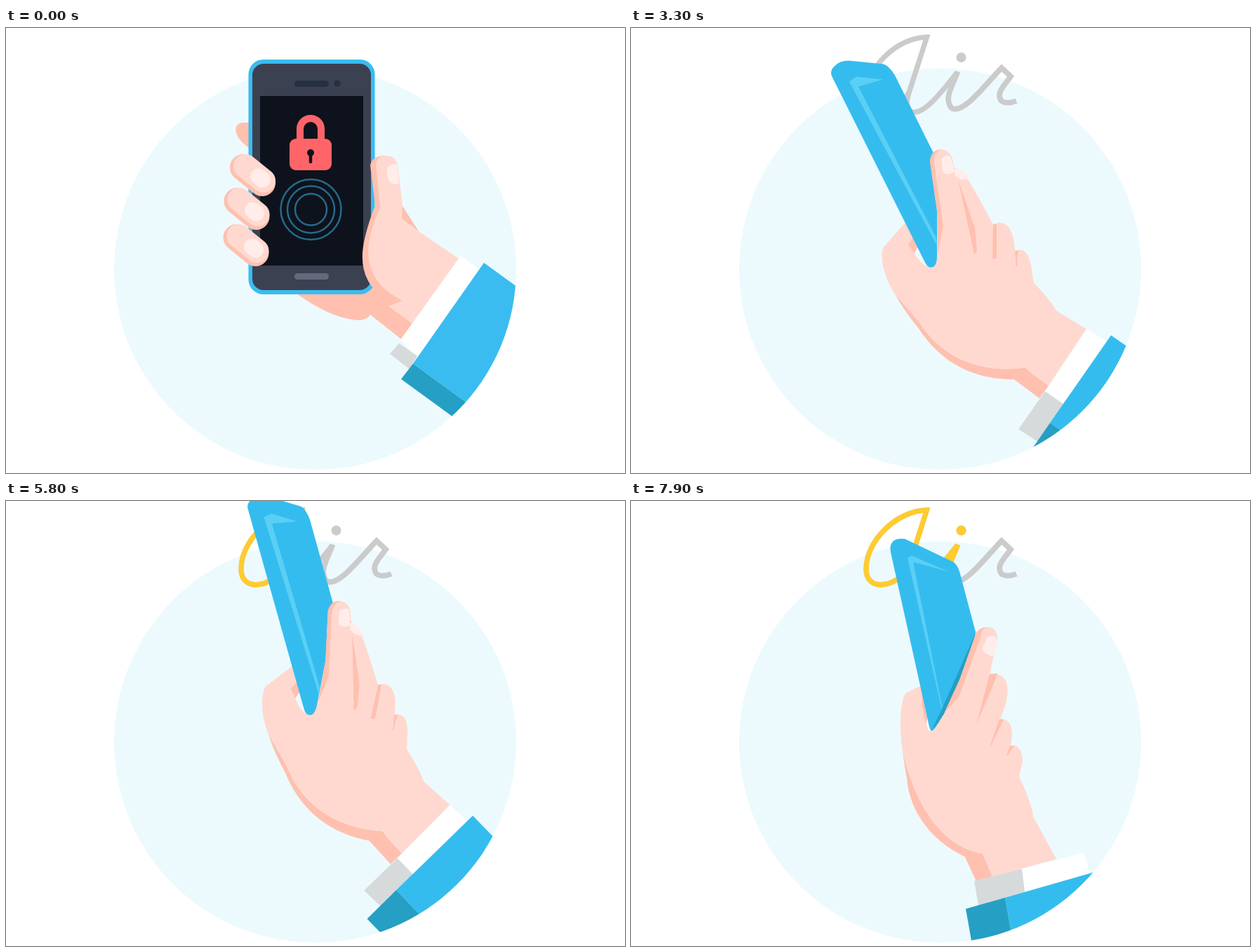
These frames come from a looping animation (882 by 635 pixels, 8 s). An HTML page:

```html
<!DOCTYPE html>
<html lang="en">
<head>
<meta charset="utf-8">
<title>Air</title>
<style>
html, body { margin: 0; width: 100%; height: 100%; overflow: hidden; background: #fff; }
svg { display: block; width: 100vw; height: 100vh; }
</style>
</head>
<body>
<svg viewBox="0 0 882 635" role="img" aria-label="Air">
  <defs>
    <clipPath id="stage"><circle cx="440.5" cy="344" r="286.5"/><rect width="882" height="200"/></clipPath>
    <g id="finger" fill="none" stroke-linecap="round">
      <path d="M338 199L365 221" stroke="#ffc0af" stroke-width="38"/>
      <path d="M341 197L367 218" stroke="#ffd9cf" stroke-width="34"/>
      <path d="M360 212L365 216" stroke="#ffedea" stroke-width="23"/>
    </g>
  </defs>
  <circle cx="440.5" cy="344" r="286.5" fill="#ecfafe"/>

  <g id="word" fill="none" stroke-miterlimit="2.2"></g>

  <g clip-path="url(#stage)">
    <g id="front">
      <path fill="#ffc0af" d="M350 135H336Q325 138 328 150Q332 162 350 174ZM405 370L414 379C450 405 480 416 503 417Q515 416 519 409L563 444L592 410L520 330Z"/>
      <rect x="345.5" y="45" width="180" height="335" rx="21" fill="#3abcf0"/>
      <rect x="351" y="51" width="169" height="323" rx="16" fill="#3c4151"/>
      <rect x="362" y="97" width="147" height="242" fill="#0e121c"/>
      <rect x="411" y="75" width="49" height="9" rx="4.5" fill="#263042"/>
      <circle cx="472" cy="79.3" r="4.7" fill="#263042"/>
      <rect x="411" y="350" width="49" height="9" rx="4.5" fill="#646a7b"/>
      <path d="M419 164V144a15 15 0 0 1 30 0V164" fill="none" stroke="#ff6568" stroke-width="10"/>
      <rect x="404" y="158" width="60" height="45" rx="9" fill="#ff6568"/>
      <path d="M434 178V191" stroke="#0e121c" stroke-width="4.5" stroke-linecap="round"/>
      <circle cx="434" cy="178" r="5" fill="#0e121c"/>
      <g fill="none" stroke="#246a89" stroke-width="2.5">
        <circle cx="434.5" cy="259" r="43"/><circle cx="434.5" cy="259" r="33.5"/><circle cx="434.5" cy="259" r="22.5"/>
      </g>
      <path fill="#ffc0af" d="M519 196Q521 183 540 182L565 254L588 290L600 400L579 422L545 396L522 370Q506 350 508 320Q510 295 526 253Z"/>
      <path fill="#ffd9cf" d="M527 196Q528 183 540 182Q555 182 558 195L565 254L564 272L588 290L645 329L579 422L545 397L565 389Q516 365 516 318Q517 295 533 255Z"/>
      <path fill="#ffedea" d="M543 201Q545 193 557 194L560 222Q546 225 544 213Z"/>
      <path fill="#fff" d="M648 325L684 351L586 470L562 445Z"/>
      <path fill="#d6dada" d="M560 450L586 468L575 487L547 465Z"/>
      <path fill="#3abcf0" d="M681 335L781 408L680 552L580 479Z"/>
      <path fill="#259fc3" d="M580 479L680 552L663 574L563 501Z"/>
      <use href="#finger"/><use href="#finger" x="-8.5" y="48"/><use href="#finger" x="-9.5" y="100"/>
    </g>
    <g id="side"></g>
  </g>
</svg>
<script>
const $ = id => document.getElementById(id);
const LOOP = 8000, STEP = 100;
const BLUE = '#35bcee', DEEP = '#259fc3', SKIN = '#ffd9cf', SHADE = '#ffc0af', NAIL = '#ffedea';
const GREY = '#cbcbcc', GOLD = '#ffcb2f';

const lerp = (a, b, k) => a + (b - a) * k;
const span = (t, from, to) => Math.min(1, Math.max(0, (t - from) / (to - from)));
const easeIn = u => u * u;
const easeOut = u => 1 - easeIn(1 - u);

function add(parent, tag, attrs) {
  const el = document.createElementNS('http://www.w3.org/2000/svg', tag);
  for (const key in attrs) el.setAttribute(key, attrs[key]);
  return parent.appendChild(el);
}

// Side view: [fill, straight wrist, bent wrist]; both outlines share their commands.
const parts = [
  [SHADE, 'M321 424L355 463C390 520 450 537 507 529L517 538L540 555L527 573L491 546C430 546 385 520 354 472Q334 448 321 424Z',
          'M387 357L393 380C411 440 446 494 501 503L504 510L515 536L492 543L476 508C425 483 396 440 393 395Q390 380 387 357Z'],
  [SKIN, 'M336 322L304 358Q301 366 304 384Q309 406 321 424L355 463C390 520 450 537 507 529L517 538L540 555L594 474L551 448Q545 436 519 408L516 390Q512 360 498 361L492 362Q490 322 469 322L461 325C450 305 440 285 426 262L405 242L405 240Q402 218 387 218Q372 218 371 235Z',
         'M414 263L392 274Q384 284 384 318Q384 340 387 357L393 380C411 440 446 494 501 503L504 510L515 536L606 511L573 450Q572 434 553 393L558 372Q557 350 545 349L541 349Q548 314 529 311L526 311C535 292 547 250 520 247L511 247L522 198Q523 180 507 180Q495 180 490 190Z'],
  [SHADE, 'M349 340L354 358L349 366L340 354Z', 'M414 264L423 306L420 318L415 293Z'],
  ['#ecfafe', 'M353 357L364 379L370 386Q357 381 349 366Z', 'M423 306L425 318L428 328Q422 329 421 318Z'],
  [SHADE, 'M411 260L435 330L438 363L434 367Z', 'M522 246L516 263L492 319L511 247Z'],
  [SHADE, 'M461 325L466 324L466 373L460 375Z', 'M525 311L531 312L512 351L511 351Z'],
  [SHADE, 'M492 363L497 362Q494 372 496 384L494 385Z', 'M540 349L547 350Q541 355 537 363L535 363Z'],
  [BLUE, 'M231 113Q228 105 235 99Q242 91 255 91L305 96Q313 99 321 112L376 223L371 235L381 305L381 372Q380 386 373 386Q368 387 364 379Z',
         'M370 73Q368 62 374 57Q379 53 390 54L455 85Q465 88 469 104L491 187L490 195L470 255L443 308Q433 327 428 328Q426 328 423 313Z'],
  ['#5acff5', 'M256 121L266 114L304 118L269 128L380 344L381 355Z', 'M394 81L400 78L453 101L402 87L444 297L442 294Z'],
  [DEEP, 'M371 235L381 305L381 372Q381 340 381 305Q376 270 371 235Z', 'M491 188L443 297L428 328Q447 305 458 283Q476 240 491 188Z'],
  [SHADE, 'M371 235Q372 218 387 218Q376 222 377 238L390 328L382 365L381 305Z', 'M491 190Q497 180 507 180Q499 182 498 195L467 280L446 303L468 255Z'],
  [NAIL, 'M405 246Q412 243 422 252L427 260Q415 264 407 255Z', 'M516 215Q516 215 516 215L516 215Q516 215 516 215Z'],
  [NAIL, 'M387 232Q392 226 399 227Q405 236 405 250Q396 256 389 250Z', 'M507 196Q512 190 520 194Q524 205 516 222Q506 220 500 212Z'],
  ['#fff', 'M594 474L632 497L561 581L535 563Z', 'M645 502L654 532L561 558L557 525Z'],
  ['#d6dada', 'M535 563L561 581L525 635L497 617Z', 'M557 525L561 558L495 577L489 542Z'],
  [BLUE, 'M629 483L789 595L702 720L542 608Z', 'M662 529L685 660L556 697L533 566Z'],
  [DEEP, 'M542 608L702 720L669 768L509 656Z', 'M533 566L556 697L500 712L477 582Z']
].map(([fill, a, b]) => ({ a, b, el: add($('side'), 'path', { fill }) }));

// Phone corner that leads the hand, in both outlines
const TIP_A = [318, 107], TIP_B = [467, 92];

function morph(a, b, k) {
  const to = b.match(/[\d.]+/g);
  let i = 0;
  return a.replace(/[\d.]+/g, n => lerp(+n, +to[i++], k).toFixed(2));
}

// Lettering: grey underneath, gold drawn on top
const A = 'M420 18L421.5 13C378 14 335 57 335 97C335 113 345 120 357 119.5C378 118 390 103 396 92L421.5 13L395 96C390 113 397 121 405 120C420 119 440 95 465 63';
const IR = 'M465.5 62C460 78 449 95 453 107C455 115 459 116 463 115.5C481 114 510 75 528 57L541 69C532 82 522 90 526 101C529 109 542 107 549 104';
const word = $('word');
function letters(stroke) {
  return {
    a: add(word, 'path', { d: A, stroke, 'stroke-width': 7.3 }),
    ir: add(word, 'path', { d: IR, stroke, 'stroke-width': 7.8 }),
    dot: add(word, 'circle', { cx: 470.5, cy: 42, r: 7, fill: stroke })
  };
}
letters(GREY);
const gold = letters(GOLD);
function reveal(path, part) {
  path.style.display = part > 0 ? '' : 'none';
  path.setAttribute('stroke-dasharray', path.getTotalLength() * part + ' 9999');
}

// Hand strokes: [start, end, route of the tip, ink reached]; ink over 1 runs into the second letter.
const strokes = [
  [1400, 1700, 'M337 53L318 107', 0],
  [3000, 3600, 'M318 107L428 18', 0],
  [3700, 5000, 'M428 18C394 53 330 78 328 98C327 122 350 130 364 120', .366],
  [5000, 5800, 'M364 120C395 112 420 70 431 21', .61],
  [5800, 6800, 'M431 21L404 104Q406 124 430 123', .867],
  [6800, 7500, 'M430 123C450 110 464 80 473 45', 1],
  [7500, 7900, 'M473 45L467 92', 1.15]
].map(([from, to, d, ink]) => {
  const route = document.createElementNS('http://www.w3.org/2000/svg', 'path');
  route.setAttribute('d', d);
  return { from, to, route, ink };
});

// The opening runs on sparse beats, the writing on every step.
const BEATS = [0, 500, 700, 900, 1100, 1400, 1600, 1700, 1900, 2100, 2300, 2500, 2600];
const onBeat = t => t < 3000 ? BEATS.filter(b => b <= t).pop() : Math.floor(t / STEP) * STEP;

function drawFront(t) {
  const angle = -9 * easeIn(span(t, 400, 900));
  const squash = 1 - .15 * span(t, 400, 1100);
  $('front').setAttribute('transform', `translate(640 450) rotate(${angle}) scale(${squash} 1) translate(-640 -450)`);
}

function drawSide(t, { from, to, route }) {
  const { x, y } = route.getPointAtLength(route.getTotalLength() * span(t, from, to));
  const bend = easeOut(span(t, 6800, 7900));
  const tilt = 15.8 * easeOut(span(t, 5000, 6800)) * (1 - bend);
  const tip = TIP_A.map((v, i) => -lerp(v, TIP_B[i], bend));
  $('side').setAttribute('transform', `translate(${x} ${y}) rotate(${tilt}) translate(${tip})`);
  for (const p of parts) p.el.setAttribute('d', morph(p.a, p.b, bend));
}

function draw(time) {
  const t = onBeat(time);
  const i = strokes.findLastIndex(s => s.from <= t);
  const stroke = strokes[i];
  $('front').style.display = stroke ? 'none' : '';
  $('side').style.display = stroke ? '' : 'none';
  if (stroke) drawSide(t, stroke);
  else drawFront(t);

  const before = i > 0 ? strokes[i - 1].ink : 0;
  const ink = stroke ? lerp(before, stroke.ink, easeOut(span(t, stroke.from, stroke.to))) : 0;
  word.setAttribute('opacity', easeIn(span(t, 1750, 2600)));
  reveal(gold.a, Math.min(1, ink));
  reveal(gold.ir, ink - 1);
  gold.dot.style.display = ink >= 1 ? '' : 'none';
}

const start = performance.now();
function tick() {
  draw((performance.now() - start) % LOOP);
  requestAnimationFrame(tick);
}
tick();
</script>
</body>
</html>
```
